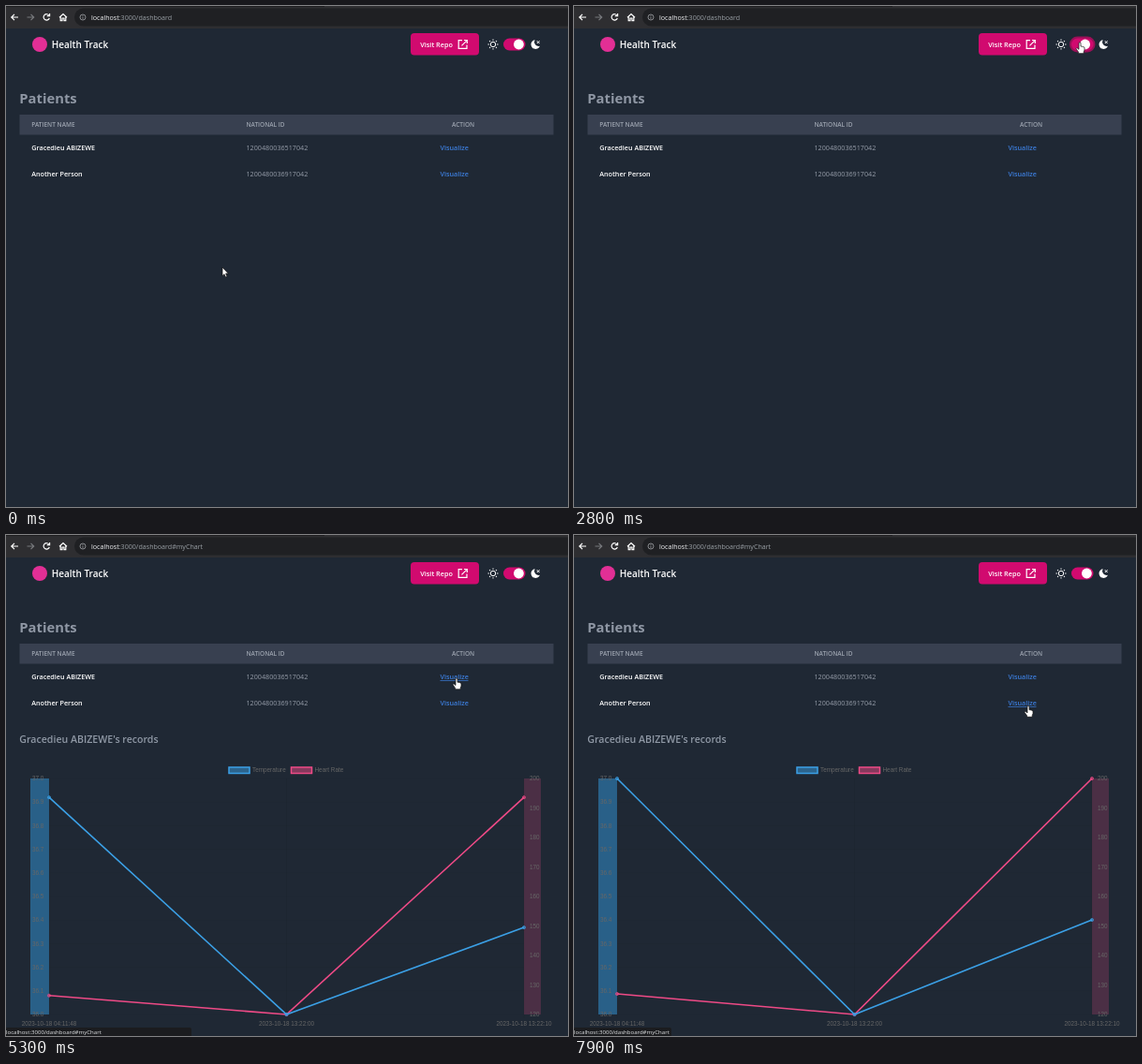
Recreate the animation shown at these times as an HTML page. Size 600 by 535 pixels, loop 8000 ms.

```html
<!DOCTYPE html>
<html lang="en">
<head>
<meta charset="utf-8">
<title>Health Track</title>
<style>
html, body { margin: 0; width: 100%; height: 100%; overflow: hidden; background: #1f2834; }
svg { display: block; width: 600px; height: 535px; font-family: "Open Sans", "Noto Sans", sans-serif; }
svg {
  --bg: #1f2834; --ink: #fff; --title: #8f97a4; --head: #384050; --headInk: #9ca3af;
  --id: #979eaa; --link: #3c7ddb; --button: #d10a6f; --track: #d10a6f; --ring: #9a1058; --card: 0;
}
svg.light {
  --bg: #fdfcfe; --ink: #15161a; --title: #6b7280; --head: #f8f7fa; --headInk: #343a46;
  --id: #7b7f88; --link: #2c5fb8; --button: #ae005a; --track: #e3e4ea; --ring: #f092c8; --card: 1;
}
.bold { font-weight: 600; }
.ink { fill: var(--ink); }
.cell { font-size: 7.2px; }
.head { font-size: 6.5px; font-weight: 600; fill: var(--headInk); }
.link { fill: var(--link); font-weight: 600; }
.chart text { font: 6.36px "Liberation Sans", Arial, sans-serif; fill: #666; }
.line { fill: none; stroke: #fff; stroke-width: 1.2; }
</style>
</head>
<body>
<svg id="stage" viewBox="0 0 600 535">
  <rect width="600" height="535" fill="var(--bg)"/>

  <!-- browser bar -->
  <rect width="600" height="24" fill="#2e2e31"/>
  <rect width="340" height="1" fill="#1d1d1f"/>
  <rect x="73" y="2.5" width="560" height="19" rx="9.5" fill="#1f2023"/>
  <path class="line" d="M13 12H6M9 8.8L5.8 12L9 15.2"/>
  <path class="line" style="stroke:#77797d" d="M22.5 12H29.5M26.5 8.8L29.7 12L26.5 15.2"/>
  <path class="line" d="M46 10.2A3.2 3.2 0 1 0 46.3 13M46.6 8V10.7H43.8"/>
  <path class="line" d="M57 12.2L61 8.5L65 12.2M58.2 11.5V15.6H60V13H62V15.6H63.8V11.5"/>
  <g fill="none" stroke="#b4b7bb" stroke-width=".7">
    <circle cx="82" cy="12" r="3"/><path d="M82 11.5V13.8M82 10.1V10.8"/>
  </g>
  <text x="91" y="14.6" font-size="7.1" fill="#f1f2f4">localhost<tspan fill="#9aa0a6">:3000/dashboard<tspan id="hash"></tspan></tspan></text>

  <!-- page header -->
  <circle cx="36" cy="41" r="8" fill="#e22f95"/>
  <text class="bold ink" x="48.7" y="44.7" font-size="10">Health Track</text>
  <rect x="432" y="29" width="73" height="23.5" rx="4" fill="var(--button)"/>
  <text class="bold" x="442.3" y="43.6" font-size="7.25" fill="#fff">Visit Repo</text>
  <path class="line" d="M487 36.7H483.2V45.3H492V41.5M489 36.5H492.3V40M492 36.8L486.5 42.3"/>
  <g id="sun" fill="none" stroke="var(--ink)" stroke-width="1"><circle cx="520" cy="41" r="2.7"/></g>
  <rect id="ring" x="529" y="32.5" width="27.5" height="17" rx="8.5" fill="var(--ring)"/>
  <rect x="531" y="34.5" width="23.5" height="13" rx="6.5" fill="var(--track)"/>
  <circle id="knob" cx="547.4" cy="41" r="5.4" fill="#fff"/>
  <path class="ink" d="M564.6 36.2A4.9 4.9 0 1 0 570 42.8A4.6 4.6 0 0 1 564.6 36.2Z"/>
  <path d="M566.8 37.2L569.6 40M569.6 37.2L566.8 40" stroke="var(--ink)" stroke-width="1"/>

  <!-- patient table -->
  <g opacity="var(--card)" style="opacity:var(--card)">
    <rect x="14" y="81" width="570.5" height="113.4" rx="4" fill="#ddd9df"/>
    <rect x="14" y="80" width="570.5" height="113" rx="4" fill="#fdfcfe"/>
  </g>
  <text x="14.3" y="104" font-size="14.8" font-weight="700" fill="var(--title)">Patients</text>
  <rect x="14.5" y="116" width="570" height="21.5" fill="var(--head)"/>
  <g id="table"></g>

  <!-- records -->
  <g id="records" class="chart">
    <text x="14.3" y="222.3" style="font:600 10.6px 'Open Sans','Noto Sans',sans-serif;fill:#9099a6" id="heading"></text>
    <g id="plot"></g>
    <path id="rate" fill="none" stroke="#ee4a86" stroke-width="1.6"/>
    <g id="rateDots"></g>
    <path id="temp" fill="none" stroke="#3ba0e6" stroke-width="1.6"/>
    <g id="tempDots"></g>
  </g>

  <g id="status">
    <path id="statusBox" fill="#1b1c1f"/>
    <text x="0" y="533.3" font-size="6.07" fill="#e4e6e9">localhost:3000/dashboard#myChart</text>
  </g>

  <g id="cursor" fill="#fff" stroke="#111" stroke-width=".7" stroke-linejoin="round">
    <path id="arrow" d="M0 0V9.2L2.1 7.4L3.5 10.4L5 9.7L3.6 6.8H6.4Z"/>
    <path id="hand" d="M-1 .5Q0 -.8 1 .5V4.2L2.3 4.3L3.7 4.7L5 5.4V8.2L4.2 10.2V11.8H-1.4V10.4L-4 6.8Q-3.6 5.4 -2.3 6.3L-1 7.5Z"/>
  </g>
</svg>
<script>
const LOOP = 8000, STEP = 100;
const PERSON = "Gracedieu ABIZEWE";
const CLICK = 4700, CHART_AT = 4832;
const XS = [46, 299.5, 553], BASE = 512, TOP = 260;
const BLUE = "#3ba0e6", PINK = "#ee4a86";
const TEMP = [260, 512, 411], RATE = [490, 512, 260];

// time, x, y of the pointer
const PATH = [
  [0, 231, 279], [500, 262, 312], [900, 310, 295], [1700, 540, 37],
  [3000, 540, 39], [3800, 481, 153], [5900, 481, 153],
  [6300, 477, 196], [7200, 477, 196], [7600, 485, 182.5], [8000, 485, 182.5]
];

const $ = id => document.getElementById(id);
const svg = $("stage");

function add(parent, tag, attrs, text) {
  const el = document.createElementNS("http://www.w3.org/2000/svg", tag);
  for (const k in attrs) el.setAttribute(k, attrs[k]);
  if (text) el.textContent = text;
  return parent.appendChild(el);
}

for (let i = 0; i < 8; i++) {
  add($("sun"), "path", { d: "M520 36.9V35.5", transform: `rotate(${i * 45} 520 41)` });
}

const table = $("table");
[[27.3, "PATIENT NAME"], [256.5, "NATIONAL ID"], [476, "ACTION"]].forEach(([x, s]) =>
  add(table, "text", { x, y: 129.4, class: "head" }, s));

const links = [[PERSON, "1200480036517042", 154.2], ["Another Person", "1200480036917042", 182.2]]
  .map(([name, id, y]) => {
    add(table, "text", { x: 27.3, y, class: "cell bold ink" }, name);
    add(table, "text", { x: 256.5, y, class: "cell", fill: "var(--id)" }, id);
    add(table, "text", { x: 463.5, y, class: "cell link" }, "Visualize");
    const line = add(table, "rect", { x: 463.5, y: y + .9, width: 30, height: .7, fill: "var(--link)" });
    return { y, line };
  });

$("heading").textContent = PERSON + "'s records";

const plot = $("plot");
function legend(x, color, label) {
  add(plot, "rect", { x, y: 248, width: 22, height: 6.5, fill: color, "fill-opacity": .5, stroke: color, "stroke-width": 1.5 });
  add(plot, "text", { x: x + 25, y: 253.4 }, label);
}
legend(238, BLUE, "Temperature");
legend(304.5, PINK, "Heart Rate");
add(plot, "rect", { x: 26, y: TOP, width: 20, height: 252, fill: "#36a2eb", "fill-opacity": .46 });
add(plot, "rect", { x: 553, y: TOP, width: 18, height: 252, fill: PINK, "fill-opacity": .21 });

const grid = d => add(plot, "path", { d, stroke: "#000", "stroke-opacity": .08, "stroke-width": .6 });
for (let i = 0; i <= 10; i++) {
  const y = TOP + i * 25.2;
  grid(`M46 ${y}H553`);
  add(plot, "text", { x: 40.3, y: y + 2.2, "text-anchor": "end" }, (37 - i / 10).toFixed(1));
}
for (let i = 0; i <= 8; i++) {
  add(plot, "text", { x: 559, y: TOP + i * 31.5 + 2.2 }, String(200 - i * 10));
}
["04:11:48", "13:22:00", "13:22:10"].forEach((time, i) => {
  grid(`M${XS[i]} ${TOP}V${BASE + 4}`);
  add(plot, "text", { x: XS[i], y: 523.6, "text-anchor": "middle" }, "2023-10-18 " + time);
});

function dots(id, color) {
  return XS.map(cx => add($(id), "circle", { cx, r: 1.6, fill: color, "fill-opacity": .6, stroke: color, "stroke-width": .6 }));
}
const series = [
  { line: $("temp"), ys: TEMP, dots: dots("tempDots", BLUE) },
  { line: $("rate"), ys: RATE, dots: dots("rateDots", PINK) }
];

const ramp = (t, a, b) => Math.min(1, Math.max(0, (t - a) / (b - a)));
const smooth = p => p * p * (3 - 2 * p);
const show = (el, on) => el.setAttribute("visibility", on ? "visible" : "hidden");

function pointer(t) {
  const i = PATH.findIndex((p, n) => n && t <= p[0]);
  const [t0, x0, y0] = PATH[i - 1], [t1, x1, y1] = PATH[i];
  const p = smooth(ramp(t, t0, t1));
  return [x0 + (x1 - x0) * p, y0 + (y1 - y0) * p];
}

function draw(t) {
  const [x, y] = pointer(t);
  const overToggle = x > 530 && x < 556 && y > 33 && y < 48;
  let overLink = false;
  for (const { y: base, line } of links) {
    const over = x > 463 && x < 494 && y > base - 8 && y < base + 2;
    show(line, over);
    overLink = overLink || over;
  }
  const hand = overToggle || overLink;
  show($("hand"), hand);
  show($("arrow"), !hand);
  $("cursor").setAttribute("transform", `translate(${x} ${y})`);

  svg.classList.toggle("light", t >= 1900 && t < 2800);
  show($("ring"), t >= 1900 && t < 3100);
  const on = 1 - smooth(ramp(t, 1850, 2000)) + smooth(ramp(t, 2690, 2840));
  $("knob").setAttribute("cx", 537.4 + 10 * on);

  $("hash").textContent = t >= CLICK ? "#myChart" : "";
  show($("status"), overLink);
  const wide = t >= CLICK && t < 6000 ? 198 : 104;
  $("statusBox").setAttribute("d", `M0 526H${wide - 2}Q${wide} 526 ${wide} 528V535H0Z`);

  show($("records"), t >= CHART_AT);
  const grow = 1 - (1 - ramp(t, CHART_AT, CHART_AT + 1000)) ** 4;
  for (const { line, ys, dots } of series) {
    const now = ys.map(v => BASE + (v - BASE) * grow);
    line.setAttribute("d", "M" + now.map((v, i) => XS[i] + " " + v).join("L"));
    dots.forEach((dot, i) => dot.setAttribute("cy", now[i]));
  }
}

const start = performance.now();
function tick() {
  const t = (performance.now() - start) % LOOP;
  draw(Math.floor(t / STEP) * STEP);
  requestAnimationFrame(tick);
}
tick();
</script>
</body>
</html>
```
